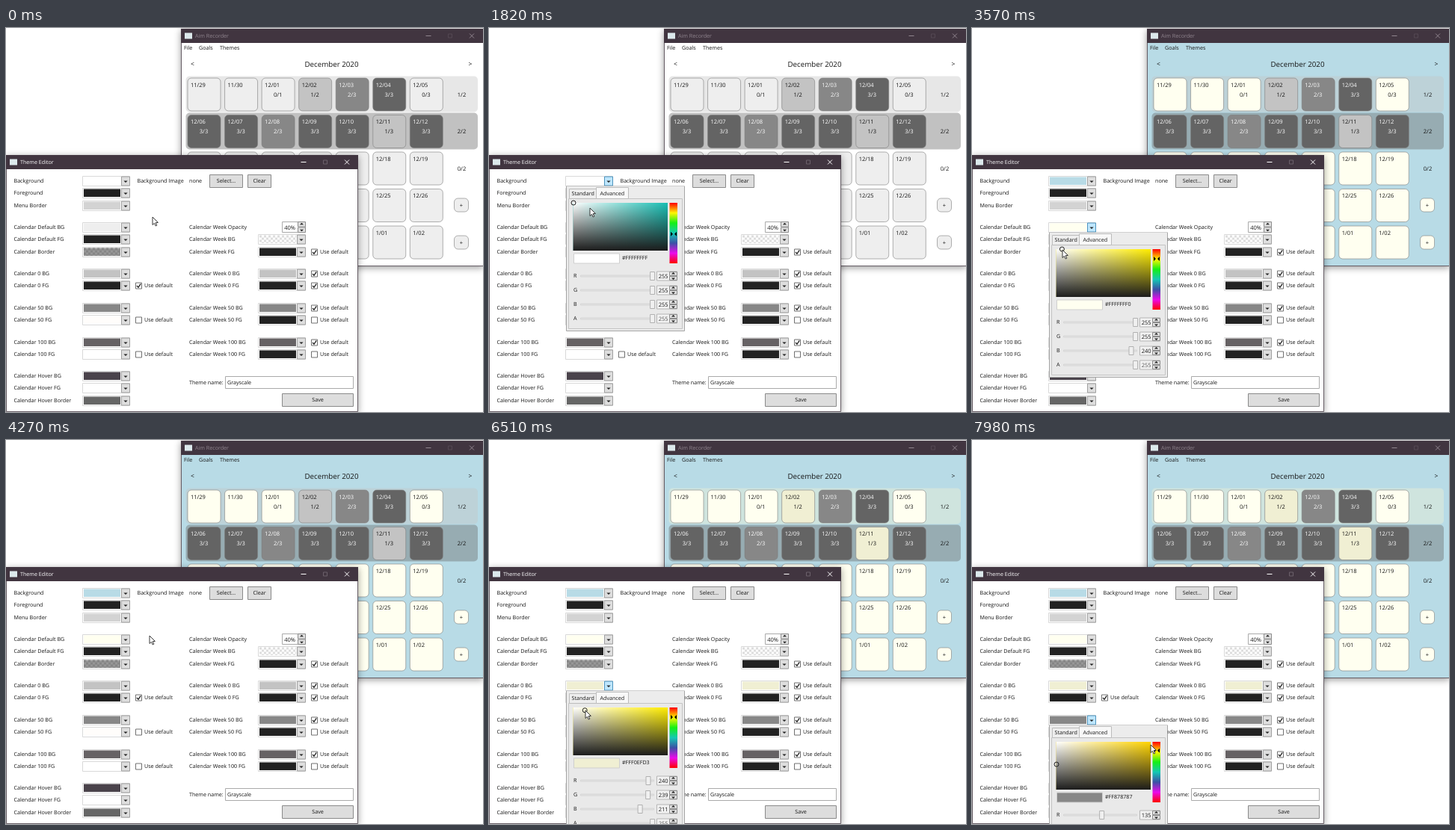
Recreate the animation shown at these times as an HTML page with a canvas. Size 638 by 514 pixels, loop 8000 ms.

```html
<!DOCTYPE html>
<html lang="en">
<head>
<meta charset="utf-8">
<title>Theme Editor</title>
<style>
html, body { margin: 0; width: 100%; height: 100%; overflow: hidden; background: #fff; }
canvas { display: block; width: 638px; height: 514px; }
</style>
</head>
<body>
<canvas id="stage"></canvas>
<script>
const W = 638, H = 514, LOOP = 8000, STEP = 70;
const canvas = document.getElementById('stage');
const c = canvas.getContext('2d');
const ratio = window.devicePixelRatio || 1;
canvas.width = W * ratio;
canvas.height = H * ratio;
c.textRendering = 'geometricPrecision';

const INK = '#151515', DARK = '#222', BAR = '#413540';

// Timelines: [time, ...values]
const cursorPath = [
  [0, 196, 253], [280, 158, 207], [700, 158, 207], [980, 247, 269],
  [1260, 247, 269], [1680, 247, 276], [1820, 135, 241], [2030, 138, 240],
  [2100, 138, 240], [2310, 158, 207], [2590, 158, 270], [2870, 158, 270],
  [3080, 247, 305], [3150, 247, 309], [3290, 247, 309], [3500, 121, 297],
  [3850, 121, 297], [4060, 192, 262], [4690, 192, 262], [5040, 158, 331],
  [5110, 158, 331], [5320, 247, 366], [5600, 247, 371], [5740, 192, 368],
  [5880, 138, 363], [6020, 129, 362], [6510, 129, 362], [6720, 192, 322],
  [7070, 158, 376], [7350, 158, 376], [7630, 247, 412], [7770, 244, 411],
  [7980, 239, 408]
];
const colorPaths = {
  background: [[1820, 255, 255, 255], [2030, 184, 219, 230]],
  base: [[3430, 238, 238, 238], [3570, 255, 255, 240]],
  zero: [[5740, 195, 195, 195], [6020, 240, 239, 211]],
  half: [[0, 135, 135, 135]]
};
const popups = [
  { open: 490, close: 2240, y: 205, key: 'background', hue: [[1190, 0], [1260, 155], [1680, 185]] },
  { open: 2800, close: 4060, y: 267, key: 'base', hue: [[3080, 0], [3150, 58]] },
  { open: 5110, close: 6650, y: 329, key: 'zero', hue: [[5320, 0], [5390, 50], [5600, 58]] },
  { open: 7140, close: LOOP, y: 375, key: 'half', hue: [[7560, 0], [7630, 46], [7980, 52]] }
];
// Muted colour wheel: [degrees, r, g, b]
const wheel = [
  [0, 255, 0, 0], [60, 255, 245, 0], [120, 20, 240, 20], [180, 20, 200, 180],
  [240, 60, 80, 165], [300, 235, 10, 235], [360, 255, 0, 0]
];

function at(keys, t) {
  if (t <= keys[0][0]) return keys[0].slice(1);
  const i = keys.findIndex(k => k[0] > t);
  if (i < 0) return keys[keys.length - 1].slice(1);
  const a = keys[i - 1], b = keys[i], p = (t - a[0]) / (b[0] - a[0]);
  return a.slice(1).map((v, n) => v + (b[n + 1] - v) * p);
}

const rgb = v => `rgb(${v.map(Math.round)})`;

function text(s, x, y, color = INK, size = 7.15, align = 'left') {
  c.font = `${size}px "Open Sans", "Noto Sans", sans-serif`;
  c.textAlign = align;
  c.fillStyle = color;
  c.fillText(s, x, y + size * 0.34);
}

function box(x, y, w, h, fill, stroke, r = 0) {
  c.beginPath();
  if (r) c.roundRect(x + .5, y + .5, w - 1, h - 1, r);
  else c.rect(stroke ? x + .5 : x, stroke ? y + .5 : y, stroke ? w - 1 : w, stroke ? h - 1 : h);
  if (fill) { c.fillStyle = fill; c.fill(); }
  if (stroke) { c.strokeStyle = stroke; c.lineWidth = 1; c.stroke(); }
}

function line(points, color, width = 1) {
  c.beginPath();
  points.forEach(p => c.lineTo(...p));
  c.strokeStyle = color;
  c.lineWidth = width;
  c.stroke();
}

function triangle(x, y, dx, dy, color = DARK) {
  c.beginPath();
  c.moveTo(x + dx, y + dy);
  c.lineTo(x - dy, y + dx);
  c.lineTo(x + dy, y - dx);
  c.fillStyle = color;
  c.fill();
}

function checker(x, y, w, h, light, dark) {
  box(x, y, w, h, light);
  c.fillStyle = dark;
  for (let j = 0; j * 3 < h; j++)
    for (let i = j % 2; i * 3 < w; i += 2)
      c.fillRect(x + i * 3, y + j * 3, Math.min(3, w - i * 3), Math.min(3, h - j * 3));
}

function windowFrame(x, y, w, h, fill, title, titleColor, icons, dim) {
  c.save();
  c.shadowColor = 'rgba(0,0,0,.4)';
  c.shadowBlur = 9 * ratio;
  c.shadowOffsetY = 2 * ratio;
  box(x, y, w, h, fill);
  c.restore();
  box(x, y, w, h, fill, '#655c64');
  box(x, y, w, 19, BAR);
  box(x + 5, y + 5.5, 10, 8, '#dce9ec');
  const [a, b, d] = icons, my = y + 9.5;
  text(title, x + 19, my, titleColor);
  line([[a - 3.5, my], [a + 3.5, my]], titleColor);
  box(b - 3, my - 3, 6, 6, null, dim);
  line([[d - 3, my - 3], [d + 3, my + 3]], titleColor);
  line([[d + 3, my - 3], [d - 3, my + 3]], titleColor);
}

function tracker(col) {
  const fills = { d: col.base, z: col.zero, h: col.half, f: '#646464' };
  const kinds = ['dddzhfd', 'ffhffzf', 'ddddddd', 'ddddddd', 'ddddddd'];
  const scores = [['', '', '0/1', '1/2', '2/3', '3/3', '0/3'],
    ['3/3', '3/3', '2/3', '3/3', '3/3', '1/3', '3/3']];
  windowFrame(234, 1, 405, 318, col.background, 'Aim Recorder', '#91868f', [565, 594, 623], '#544853');
  text('File', 238, 26.5);
  text('Goals', 258, 26.5);
  text('Themes', 286, 26.5);
  text('<', 247, 48.5, INK, 8.5);
  text('December 2020', 435.5, 48.5, INK, 9.75, 'center');
  text('>', 618.5, 48.5, INK, 8.5);

  c.globalAlpha = .4;
  box(240, 64, 391.5, 49, col.zero, null, 5);
  box(240, 113, 391.5, 50, fills.f, null, 5);
  c.globalAlpha = 1;

  kinds.forEach((row, r) => [...row].forEach((kind, i) => {
    const x = 242.5 + i * 49.55, y = 66.5 + r * 49.5;
    const day = new Date(2020, 10, 29 + r * 7 + i);
    const month = day.getMonth() + 1;
    const label = month + '/' + String(day.getDate()).padStart(2, '0');
    const ink = kind === 'h' || kind === 'f' ? '#fff' : INK;
    box(x, y, 45, 45, fills[kind], 'rgba(125,125,125,.6)', 5);
    text(label, x + 4.5, y + 9.5, ink, 7.5);
    if (scores[r]) text(scores[r][i], x + 22, y + 22.5, ink, 7.5, 'center');
  }));
  ['1/2', '2/2', '0/2'].forEach((s, r) => text(s, 609.5, 89 + r * 49.5, INK, 7.5, 'center'));
  [237, 287].forEach(y => {
    box(599, y - 9.5, 20, 19, col.base, 'rgba(125,125,125,.6)', 5);
    text('+', 609, y, INK, 7.5, 'center');
  });
}

function combo(x, y, fill, active) {
  const swatch = [x + 2, y - 5.5, 49, 10.5];
  box(x, y - 7, 64, 14, '#fff', '#d9d9d9');
  if (fill === 'clear') checker(...swatch, '#fff', '#ddd');
  else if (fill === 'mesh') checker(...swatch, '#979797', '#858585');
  else box(...swatch, fill);
  box(x + 52, y - 6.5, 12, 13, active ? '#bee6fd' : '#dedede', active ? '#4e94bd' : '#a0a0a0');
  triangle(x + 58, y - .5, 0, 2.6);
}

function checkbox(x, y, checked) {
  box(x, y - 4.5, 9, 9, '#fff', '#707070');
  if (checked) line([[x + 2, y], [x + 4, y + 2.2], [x + 7.2, y - 2.6]], DARK, 1.3);
  text('Use default', x + 12, y);
}

function button(s, x, y, w, h) {
  box(x, y, w, h, '#ddd', '#8a8a8a');
  text(s, x + w / 2, y + h / 2, INK, 7.15, 'center');
}

function spinner(x, y, h) {
  box(x, y - h / 2, 11, h / 2, '#e2e2e2', '#8c8c8c');
  box(x, y, 11, h / 2, '#e2e2e2', '#8c8c8c');
  triangle(x + 5.5, y - h / 4 + .5, 0, -2.6);
  triangle(x + 5.5, y + h / 4 - .5, 0, 2.6);
}

function editor(col, popup) {
  windowFrame(0, 170, 471, 344, '#fff', 'Theme Editor', '#fff', [398, 427, 456], '#6b606a');
  // label, row, swatch, checkbox state
  const left = [
    ['Background', 205, col.background], ['Foreground', 221, DARK], ['Menu Border', 238, '#d3d3d3'],
    ['Calendar Default BG', 267, col.base], ['Calendar Default FG', 283, DARK], ['Calendar Border', 300, 'mesh'],
    ['Calendar 0 BG', 329, col.zero], ['Calendar 0 FG', 345, DARK, true],
    ['Calendar 50 BG', 375, col.half], ['Calendar 50 FG', 391, '#fffdfb', false],
    ['Calendar 100 BG', 421, '#666264'], ['Calendar 100 FG', 437, '#fff', false],
    ['Calendar Hover BG', 466, '#4a434b'], ['Calendar Hover FG', 482, '#fff'],
    ['Calendar Hover Border', 499, '#666']
  ];
  const right = [
    ['BG', 283, 'clear'], ['FG', 300, DARK, true],
    ['0 BG', 329, col.zero, true], ['0 FG', 345, DARK, true],
    ['50 BG', 375, col.half, true], ['50 FG', 391, DARK, false],
    ['100 BG', 421, '#666264', true], ['100 FG', 437, DARK, false]
  ];
  left.forEach(([label, y, fill, check]) => {
    text(label, 10.5, y);
    combo(102, y, fill, popup && popup.y === y);
    if (check !== undefined) checkbox(173, y, check);
  });
  right.forEach(([label, y, fill, check]) => {
    text('Calendar Week ' + label, 245, y);
    combo(337, y, fill);
    if (check !== undefined) checkbox(408, y, check);
  });
  text('Calendar Week Opacity', 245, 267);
  box(369, 259, 32, 15, '#fff', '#aaa');
  text('40%', 387, 267, INK, 7.5, 'right');
  spinner(390, 266.5, 15);
  text('Background Image', 175.5, 205);
  text('none', 245, 205);
  button('Select...', 272, 196, 45, 18);
  button('Clear', 323, 196, 32, 18);
  text('Theme name:', 245, 475);
  box(293, 466, 172, 17, '#fff', '#aaa');
  text('Grayscale', 296, 475);
  button('Save', 369, 489, 96, 18);
}

function gradient(x0, y0, x1, y1, stops) {
  const g = c.createLinearGradient(x0, y0, x1, y1);
  stops.forEach((s, i) => g.addColorStop(i / (stops.length - 1), s));
  return g;
}

function picker(popup, t) {
  const y = popup.y, value = at(colorPaths[popup.key], t), hue = at(popup.hue, t)[0];
  const top = y + 29, slide = Math.min(1, .8 + (t - popup.open) / STEP * .2);
  c.save();
  c.beginPath();
  c.rect(100, y + 6.5, 166, 220);
  c.clip();
  c.translate(0, (slide - 1) * 194);

  box(103, y + 6, 159, 195, '#ececec', '#a5a5a5');
  box(106, y + 23, 153, 175, '#e9e9e9', '#c4c4c4');
  box(107, y + 10, 37, 14, '#eee', '#bcbcbc');
  box(143, y + 8, 44, 16, '#f8f8f8', '#bcbcbc');
  text('Standard', 110.5, y + 17);
  text('Advanced', 148.5, y + 16.5);

  box(112.5, top, 126.5, 64, rgb(at(wheel, hue)));
  box(112.5, top, 126.5, 64, gradient(112.5, 0, 239, 0, ['#fff', 'rgba(255,255,255,0)']));
  box(112.5, top, 126.5, 64, gradient(0, top, 0, top + 64, ['rgba(28,28,28,0)', 'rgb(28,28,28)']));
  const max = Math.max(...value), min = Math.min(...value);
  c.beginPath();
  c.arc(113 + (1 - min / max) * 126, top + (1 - max / 255) * 64, 3, 0, 7);
  c.strokeStyle = '#222';
  c.lineWidth = 1;
  c.stroke();

  box(241.5, top, 10.5, 81, gradient(0, top, 0, top + 81, wheel.map(([, ...v]) => rgb(v))));
  const hy = top + hue / 360 * 81;
  triangle(243, hy, 3, 0, '#000');
  triangle(251, hy, -3, 0, '#000');

  box(113, y + 96.5, 62, 14, rgb(value), '#cfcfcf');
  const hex = value.map(v => Math.round(v).toString(16).padStart(2, '0')).join('').toUpperCase();
  text('#FF' + hex, 178, y + 103);

  [...value, 255].forEach((v, i) => {
    const ry = y + 127 + i * 19;
    text('RGBA'[i], 113, ry);
    box(122, ry - 1.5, 99, 3, '#e2e2e2', '#d6d6d6');
    box(119.5 + v * .375, ry - 6, 7, 12, '#f0f0f0', '#b0b0b0');
    box(224, ry - 6.5, 28, 13, '#f2f2f2', '#b5b5b5');
    text(Math.round(v), 239.5, ry, i === 3 ? '#555' : INK, 7.5, 'right');
    spinner(241, ry, 12);
  });
  c.restore();
}

function cursor([x, y]) {
  c.beginPath();
  [[0, 0], [0, 10.5], [2.5, 8.3], [4.2, 12], [5.8, 11.2], [4.2, 7.6], [7.4, 7.4]]
    .forEach(([dx, dy]) => c.lineTo(x + dx, y + dy));
  c.closePath();
  c.fillStyle = '#fff';
  c.fill();
  c.strokeStyle = '#222';
  c.lineWidth = .9;
  c.stroke();
}

function draw(now) {
  const t = Math.floor((now % LOOP) / STEP) * STEP;
  const col = {};
  for (const key in colorPaths) col[key] = rgb(at(colorPaths[key], t));
  const popup = popups.find(p => t >= p.open && t < p.close);
  c.setTransform(ratio, 0, 0, ratio, 0, 0);
  box(0, 0, W, H, '#fff');
  tracker(col);
  editor(col, popup);
  if (popup) picker(popup, t);
  cursor(at(cursorPath, t));
}

const start = performance.now();
function tick() {
  draw(performance.now() - start);
  requestAnimationFrame(tick);
}
tick();
</script>
</body>
</html>
```
